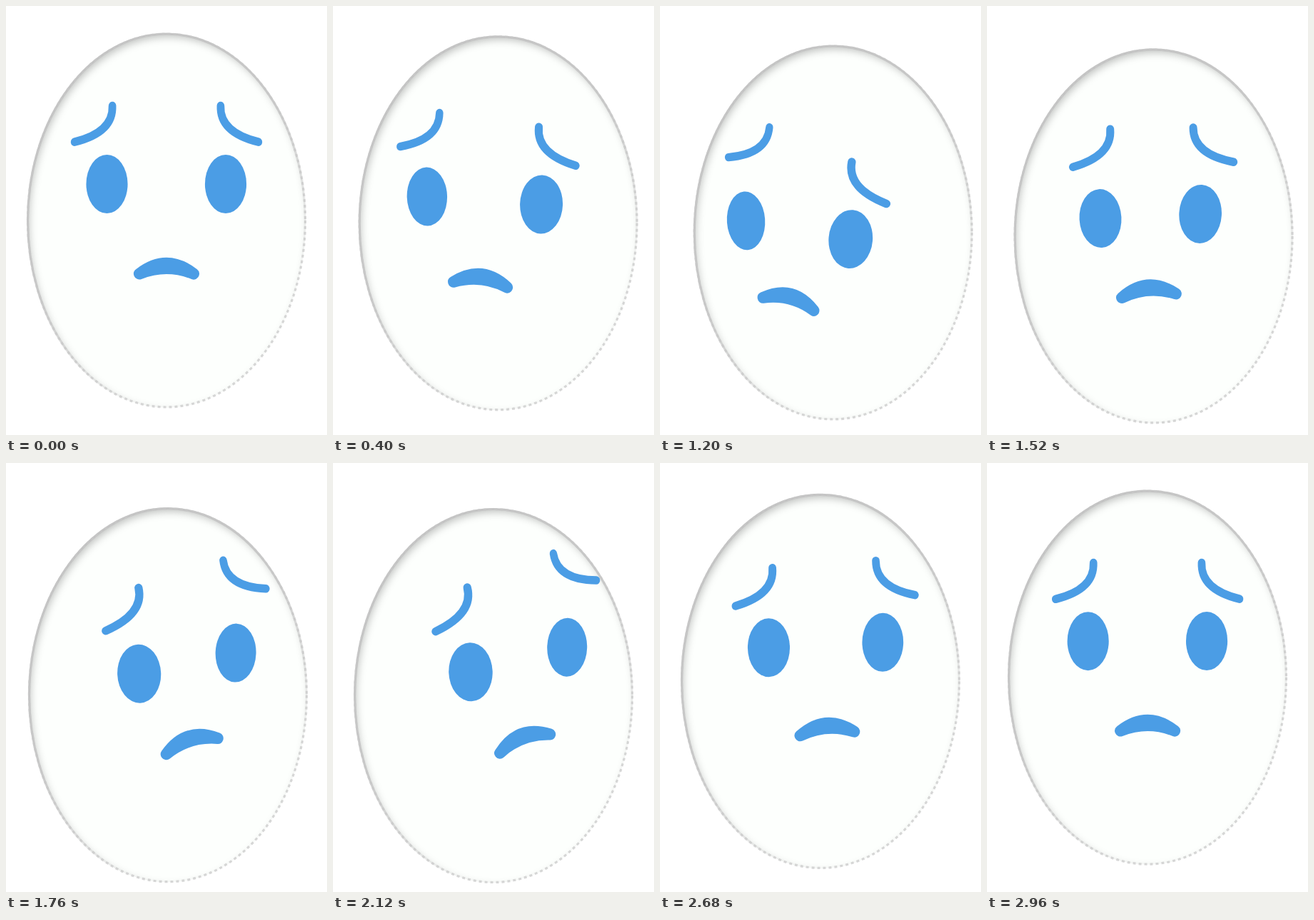
An HTML page for the animation above (3 s loop, 450x600 px).

```html
<!DOCTYPE html>
<html lang="en">
<head>
<meta charset="utf-8">
<title>Worried egg</title>
<style>
  html, body { margin: 0; width: 100%; height: 100%; overflow: hidden; background: #fff; }
  svg { display: block; width: 100vw; height: 100vh; }
</style>
</head>
<body>
<svg viewBox="0 0 450 600">
  <defs>
    <clipPath id="shell"><ellipse rx="195" ry="261.5"/></clipPath>
    <filter id="soft" x="-10%" y="-10%" width="120%" height="120%"><feGaussianBlur stdDeviation="6"/></filter>
    <linearGradient id="rim" x1=".2" y1="0" x2=".8" y2="1">
      <stop offset="0" stop-color="#c2c2c2"/>
      <stop offset=".45" stop-color="#c4c4c4" stop-opacity=".85"/>
      <stop offset=".8" stop-color="#c8c8c8" stop-opacity="0"/>
    </linearGradient>
    <path id="brow" d="M13-31.5Q14.8 5.8-44 19.2" fill="none" stroke-width="11.5"/>
    <ellipse id="eye" rx="31" ry="41" stroke="none"/>
    <path id="mouth" d="M-38 11Q0-18 38 11Q0-4-38 11Z" stroke-width="16" stroke-linejoin="round"/>
  </defs>
  <g id="egg">
    <ellipse rx="195" ry="261.5" fill="#fdfffd"/>
    <g clip-path="url(#shell)">
      <path filter="url(#soft)" fill="#000" fill-opacity=".25" fill-rule="evenodd"
        d="M-240-310H240V310H-240ZM-193 5A196 262 0 0 0 199 5A196 262 0 0 0-193 5Z"/>
    </g>
    <g fill="none" stroke-width="3.2">
      <ellipse rx="194.5" ry="261" stroke="url(#rim)"/>
      <ellipse rx="194.5" ry="261" stroke="#c8c8c8" stroke-opacity=".7" stroke-dasharray="4 4"/>
    </g>
  </g>
  <g id="face" fill="#4b9de5" stroke="#4b9de5" stroke-linecap="round"></g>
</svg>
<script>
const LOOP = 3000, STEP = 40, LEFT = 990, RIGHT = 1980;
const MIDDLE = 225, DEPTH = 240, SINK = 26.5;
const egg = document.getElementById('egg');
const face = document.getElementById('face');

// side mirrors the shape; roll and splay say how far it follows the tilt of the head.
// Key points: at rest, looking down left, looking up right.
const parts = [
  { shape: 'brow', side: 1, roll: 1, splay: 0, path: [[137, 171], [133, 198], [184, 209]] },
  { shape: 'brow', side: -1, roll: 1, splay: 0, path: [[313, 171], [272, 261], [327, 154]] },
  { shape: 'eye', side: 1, roll: 0, splay: -1, path: [[141.5, 249], [113, 301], [195, 294]] },
  { shape: 'eye', side: -1, roll: 0, splay: 1, path: [[308, 249], [261, 333], [329, 258]] },
  { shape: 'mouth', side: 1, roll: 1.65, splay: 0, path: [[225, 363.5], [174, 408.5], [267, 383]] }
];
const swing = [[MIDDLE], [MIDDLE + 19.5], [MIDDLE]];
const tilt = [[0, 0], [10.5, 5], [-12.7, 2]];

for (const part of parts) {
  part.node = document.createElementNS('http://www.w3.org/2000/svg', 'use');
  part.node.setAttribute('href', '#' + part.shape);
  face.appendChild(part.node);
}

// cubic-bezier(.42, 0, .58, 1)
function easeInOut(x) {
  let lo = 0, hi = 1;
  for (let i = 0; i < 24; i++) {
    const u = (lo + hi) / 2, v = 1 - u;
    if (3 * v * v * u * .42 + 3 * v * u * u * .58 + u * u * u < x) lo = u; else hi = u;
  }
  return lo * lo * (3 - 2 * lo);
}

const span = (t, from, to) => (t - from) / (to - from);
const mix = (a, b, k) => a.map((v, i) => v + (b[i] - v) * k);

function along(t, [rest, left, right]) {
  if (t < LEFT) return mix(rest, left, easeInOut(span(t, 0, LEFT)));
  if (t < RIGHT) return mix(left, right, easeInOut(span(t, LEFT, RIGHT)));
  return mix(right, rest, easeInOut(span(t, RIGHT, LOOP)));
}

// The egg sinks during both looks, then rises back.
function eggY(t) {
  if (t >= RIGHT) return 300 + SINK * (1 - easeInOut(span(t, RIGHT, LOOP)));
  const p = t / RIGHT;
  return 300 + SINK * (p + easeInOut(p)) / 2;
}

function draw(t) {
  const [eggX] = along(t, swing);
  const [roll, splay] = along(t, tilt);
  egg.setAttribute('transform', `translate(${eggX} ${eggY(t)})`);
  for (const part of parts) {
    const [x, y] = along(t, part.path);
    // Parts get narrower towards the edge of the round shell.
    const narrow = Math.sqrt(1 - ((x - eggX) / DEPTH) ** 2);
    const angle = part.roll * roll + part.splay * splay;
    part.node.setAttribute('transform',
      `translate(${x} ${y}) scale(${narrow} 1) rotate(${angle}) scale(${part.side} 1)`);
  }
}

const began = performance.now();
function tick() {
  const t = (performance.now() - began) % LOOP;
  draw(Math.floor(t / STEP) * STEP);
  requestAnimationFrame(tick);
}
tick();
</script>
</body>
</html>
```
